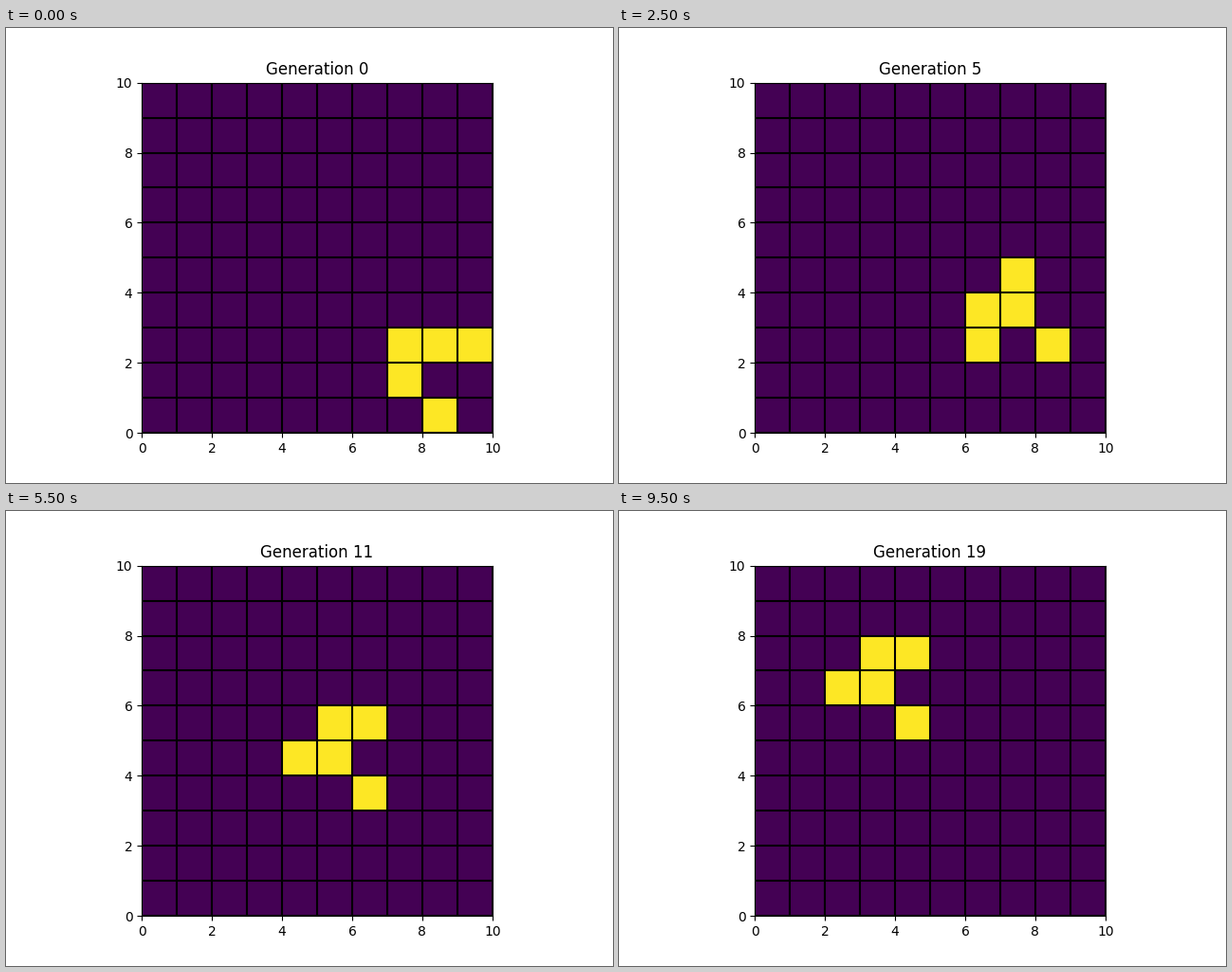
A matplotlib script that plays this animation: 640x480 px, repeating every 10000 ms.

```python
import matplotlib.pyplot as plt
import numpy as np
from matplotlib.animation import FuncAnimation

SIZE = 10
GENERATIONS = 20
GLIDER = [(7, 2), (8, 2), (9, 2), (7, 1), (8, 0)]  # (column, row)


def first_grid():
    grid = np.zeros((SIZE, SIZE), dtype=int)
    for col, row in GLIDER:
        grid[row, col] = 1
    return grid


def next_grid(grid):
    padded = np.pad(grid, 1)
    around = sum(
        padded[dy:dy + SIZE, dx:dx + SIZE] for dy in range(3) for dx in range(3)
    ) - grid
    return ((around == 3) | ((grid == 1) & (around == 2))).astype(int)


history = [first_grid()]
while len(history) < GENERATIONS:
    history.append(next_grid(history[-1]))

fig, ax = plt.subplots(figsize=(6.4, 4.8), dpi=100)
mesh = ax.pcolormesh(history[0], cmap="viridis", vmin=0, vmax=1)
for edge in range(SIZE + 1):
    ax.axhline(edge, color="k", linewidth=1.5)
    ax.axvline(edge, color="k", linewidth=1.5)
ax.set(xlim=(0, SIZE), ylim=(0, SIZE), aspect="equal",
       xticks=range(0, SIZE + 1, 2), yticks=range(0, SIZE + 1, 2))
title = ax.set_title("Generation 0")


def update(generation):
    mesh.set_array(history[generation])
    title.set_text(f"Generation {generation}")
    return mesh, title


anim = FuncAnimation(fig, update, frames=GENERATIONS, interval=500,
                     repeat=True, repeat_delay=0, blit=False)
plt.show()
```
